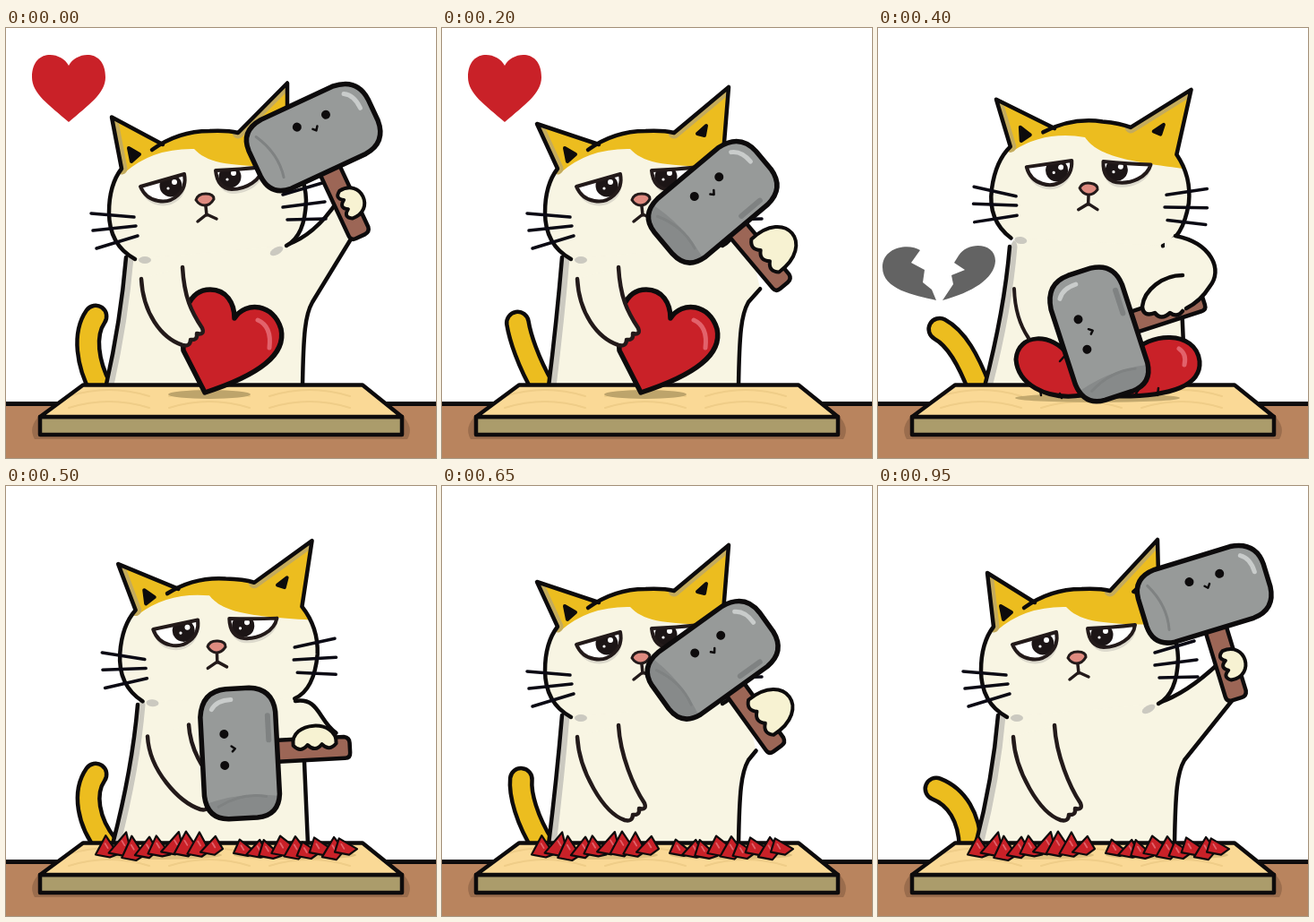
An HTML page with a canvas that plays this animation: 480 by 480 pixels, repeating every 1 s.

```html
<!DOCTYPE html>
<html lang="en">
<head>
<meta charset="utf-8">
<title>Cat and hammer</title>
<style>
html, body { margin: 0; width: 100%; height: 100%; overflow: hidden; background: #fff; }
canvas { display: block; width: 100vw; height: 100vh; }
</style>
</head>
<body>
<canvas id="stage" width="480" height="480"></canvas>
<script>
const ctx = document.getElementById('stage').getContext('2d');
const INK = '#0d0b0c', SOFT_INK = '#231a1a', CREAM = '#f8f5e3', YELLOW = '#ecbd1f', RED = '#c92128',
  SHADE = '#cbc9c0', STEEL = '#979a99', STEEL_DARK = '#7f8282', WOOD = '#9c6656', PINK = '#e2626b';
const STEP = 50, COUNT = 20;
const CRACK = 6, SMASH = 7, BURST = 9;

// Hammer x, y, angle along the blow, from fully raised to impact
const ARC = [[365, 120, -17], [344, 121, -25], [303, 193, -40], [276, 255, -78], [246, 341, -108]];

const mix = (a, b, k) => a + (b - a) * k;
const clamp = v => Math.min(1, Math.max(0, v));
const noise = k => { const v = Math.sin(k * 12.9898) * 43758.5453; return v - Math.floor(v); };

// Place on ARC: slow start, fast blow, short rest, then the reverse
function blow(n) {
  if (n <= 8) return Math.max(n / 2, 1 + n / 4);
  return Math.min(4, Math.max(4 - (n - 9) / 2, 1 - (n - 15) / 4));
}

function poseAt(n) {
  const u = n > 4 && n <= 8 ? n / 2 : n <= 4 ? 1 + n / 4 : blow(n);
  const i = Math.min(3, Math.floor(u));
  const [hx, hy, swing] = ARC[i].map((v, j) => mix(v, ARC[i + 1][j], u - i));
  const lag = n > 11 ? 6 * Math.sin(Math.PI * (n - 11) / 8) : 0;
  const ha = swing + lag, r = ha * Math.PI / 180;
  const lean = clamp(u - 2), press = clamp(u - 3);
  const nx = mix(222, 235, lean), ny = mix(192, 180, lean);
  const near = (n + 1) % COUNT;
  const ear = clamp(1 - Math.min(near, COUNT - near) / 4);
  const free = n >= BURST;
  return {
    nx, ny, hx, hy, ha, ear, tilt: 8 * press,
    bl: 119 - 10 * ear, br: 331 + 12 * press,
    sx: nx - 71 - 12 * press, sy: ny + 88 + 23 * press,
    ex: nx - (free ? 18 : 25), ey: ny + (free ? 181 : 162),
    gx: hx + 8 * Math.cos(r) - 84 * Math.sin(r),
    gy: hy + 8 * Math.sin(r) + 84 * Math.cos(r),
    stage: u < 1.6 ? 'up' : u < 2.4 ? 'mid' : u < 3.6 ? 'over' : 'down'
  };
}

function shape(d, fill, line, width = 4.5) {
  const p = new Path2D(d);
  if (fill) { ctx.fillStyle = fill; ctx.fill(p); }
  if (line) { ctx.strokeStyle = line; ctx.lineWidth = width; ctx.stroke(p); }
}

function ball(x, y, rx, fill, ry = rx, turn = 0) {
  ctx.beginPath();
  ctx.ellipse(x, y, rx, ry, turn, 0, 7);
  ctx.fillStyle = fill;
  ctx.fill();
}

function local(x, y, deg, draw) {
  ctx.save();
  ctx.translate(x, y);
  ctx.rotate(deg * Math.PI / 180);
  draw();
  ctx.restore();
}

function clipped(d, draw) {
  ctx.save();
  ctx.clip(new Path2D(d));
  draw();
  ctx.restore();
}

function table() {
  ctx.fillStyle = '#fff';
  ctx.fillRect(0, 0, 480, 480);
  ctx.fillStyle = '#b9845e';
  ctx.fillRect(0, 419, 480, 61);
  ctx.fillStyle = INK;
  ctx.fillRect(0, 417, 480, 5);
}

function board() {
  const top = 'M86 398.5 H398 L442 434 H38 Z';
  shape('M38 432 Q24 446 32 459 H448 Q456 446 442 432 Z', '#9b6d4d');
  shape('M38 434 H442 V454 H38 Z', '#ab9c6b', INK);
  shape(top, '#fad996');
  for (let i = 0; i < 6; i++) {
    const x = 70 + i % 3 * 112, y = 411 + (i > 2 ? 13 : 0);
    shape(`M${x} ${y} q45 -14 90 0`, null, '#efcd88', 2);
  }
  shape(top, null, INK);
}

function floatingHeart(n) {
  if (n < SMASH) {
    shape('M70 42 C78 26 111 22 111 55 C111 73 92 86 70 105 C48 86 29 73 29 55 C29 22 62 26 70 42', RED);
  } else if (n < 10) {
    const d = n - 8;
    ctx.save();
    ctx.translate(0, d < 0 ? -130 : d * 55);
    ctx.globalAlpha = d > 0 ? .5 : 1;
    local(65 - d * 5, 304, -d * 8, () =>
      shape('M0 0 C-25 -6 -60 -12 -60 -37 C-60 -60 -30 -64 -18 -56 L-28 -42 L-13 -34 L-15 -20 L-5 -12 Z', '#636363'));
    local(72 + d * 5, 304, d * 8, () =>
      shape('M0 0 C33 -9 58 -24 59 -44 C59 -65 28 -66 18 -50 L13 -42 L25 -34 L10 -28 L12 -18 Z', '#636363'));
    ctx.restore();
  }
}

function tail(n, p) {
  const k = n % 10 / 9;
  const d = `M${p.bl - 6} 402 C${mix(91, 102, k)} ${mix(375, 370, k)} ${mix(86, 88, k)} ${mix(342, 347, k)} ` +
    `${100 - 35 * k} ${322 + 16 * k}`;
  shape(d, null, INK, 29);
  shape(d, null, YELLOW, 20);
}

function body({ nx, ny, bl, br, gx, gy, stage }) {
  const side = `Q${nx - 94} ${ny + 135} ${bl} 400`;
  const left = `M${nx - 88} ${ny + 64} ${side}`;
  const reaching = stage === 'up' || stage === 'mid';
  const arm = `L${gx - 17} ${gy} Q${nx + 122} ${ny + 40} ${nx + 91} ${ny + 50}`;
  const right = reaching
    ? `${br} 400 C${br + 1} 340 ${br + 3} 320 342 306 L${gx - (stage === 'mid' ? 8 : 0)} ${gy + 39}`
    : `${br} 400 L${br - 4} 308`;
  const whole = `M${nx - 60} ${ny + 20} L${nx - 88} ${ny + 64} ${side} L${right} ` +
    `${reaching ? arm : `L${nx + 93} ${ny + 45}`} Z`;
  shape(whole, CREAM);
  clipped(whole, () => shape(left, null, SHADE, 17));
  shape(left, null, INK);
  shape('M' + right, null, INK);
  if (stage === 'up') shape('M' + arm.slice(1), null, INK);
}

function eye(d, x, y) {
  ctx.save();
  ctx.translate(1, 5);
  shape(d, '#dcd9cc');
  ctx.restore();
  shape(d, '#fff');
  clipped(d, () => {
    ball(x, y, 12.5, '#1c1516');
    ball(x + 4, y - 4, 3, '#fff');
    ball(x - 3, y + 3, 1.6, '#fff');
  });
  shape(d, null, SOFT_INK, 4);
}

function head(p) {
  const earL = `${mix(-116, -100, p.ear)} ${mix(-85, -95, p.ear)}`;
  const earR = `${mix(98, 90, p.ear)} ${mix(-126, -132, p.ear)}`;
  const left = `M-78 66 Q-107 50 -107 14 Q-107 -17 -93 -35 L${earL} L-47 -62`;
  const right = `5 -77 Q25 -78 37 -75 L${earR} L92 -52 Q112 -30 113 0 Q112 40 91 51`;
  const whole = `${left} Q-20 -77 ${right} Z`;
  shape(whole, CREAM);
  clipped(whole, () => {
    shape('M-140 -22 L-89 -31 Q-58 -58 -12 -57 C4 -40 30 -36 120 -38 V-150 H-140 Z', YELLOW);
    shape(`M-93 -35 L${earL} M37 -75 L${earR}`, null, '#c4ab5c', 13);
  });
  shape(left, null, INK);
  shape('M-59 -56 Q-30 -77 ' + right, null, INK);
  shape('M-85 -58 L-73 -51 L-82 -43 Z M63 -74 L73 -83 L71 -72 Z', INK, INK, 4);
  ball(-67, 67, 7, SHADE, 4);
  if (p.stage === 'up') ball(80, 57, 8, SHADE, 4, -.5);

  eye('M-72 -15 L-23 -29 C-19 -9 -36 4 -52 1 Q-66 -1 -72 -15 Z', -38, -16);
  eye('M12 -33 Q40 -34 65 -37 C63 -22 46 -12 30 -12 Q14 -13 12 -33 Z', 28, -26);
  shape('M-10 0 Q-8 -7 1 -7 Q10 -7 10 -1 Q6 6 0 6 Q-6 6 -10 0 Z', '#df8b80', SOFT_INK, 3);
  shape('M1 7 L2 17 M-8 24 L2 16 L13 21', null, SOFT_INK, 3.5);
  shape('M-127 15 L-79 19 M-125 34 L-77 29 M-121 54 L-75 40 ' +
    'M87 -6 L131 -19 M87 8 L134 2 M92 22 L135 21', null, '#0b0a14', 3.5);
}

function smashed() {
  ball(245, 413, 92, '#c2a86d', 5);
  shape('M154 370 C156 340 195 340 212 365 L228 410 C185 416 156 396 154 370 Z', RED, INK, 5);
  shape('M284 364 C300 340 355 336 359 372 C361 398 330 412 265 411 Z', RED, INK, 5);
  shape('M203 372 L212 362 M181 404 L182 410 M203 408 L205 413 M288 408 L292 402 M312 410 L313 402', null, INK, 2.5);
  shape('M336 358 Q345 364 342 376', null, PINK, 5);
}

function heap(from, to, seed, flight) {
  const total = 9, mid = (from + to) / 2;
  ball(mid, 412, (to - from) / 2, '#dfc07e', 5);
  for (let i = 0; i < total; i++) {
    const r = j => noise(seed + i * 5 + j);
    const x = mix(from + 12, to - 12, i / (total - 1)) + flight * (i - 4) * 3;
    const y = 408 + 8 * r(0) - flight * (12 + 22 * r(1));
    const tip = 16 * r(2) - 8, h = 16 + 10 * r(3);
    shape(`M${x - 12} ${y - 1} L${x + tip} ${y - h} L${x + 13} ${y - 9 * r(4)} L${x + 4} ${y + 2} Z`, RED, INK, 2.2);
    shape(`M${x + tip / 2 - 1} ${y - h * .6} l3 5`, null, PINK, 1.8);
  }
}

function heart(n) {
  if (n >= BURST) {
    const flight = n === BURST ? 1 : 0;
    heap(100, 241, 3, flight);
    heap(254, 391, 70, flight);
    return;
  }
  if (n >= SMASH) return smashed();
  if (n < CRACK) {
    ball(227, 409, 46, '#bda46b', 5);
    shape('M222 407 L198 360 C195 320 203 292 228 292 C246 292 255 307 255 324 ' +
      'C268 304 299 308 307 336 C313 364 284 387 222 407 Z', RED, INK, 5.5);
    shape('M281 326 Q297 333 294 357', null, PINK, 5);
  } else {
    ball(237, 412, 46, '#bda46b', 5);
    shape('M230 411 C205 393 180 370 187 343 C200 318 235 315 246 334 ' +
      'C262 320 305 325 305 356 C303 384 260 398 230 411 Z', RED, INK, 5);
    shape('M240 324 L253 326 L244 352 L250 361 L238 384 L242 364 L235 353 Z', '#fff', INK, 2.5);
    shape('M285 335 Q296 345 290 362', null, PINK, 5);
  }
}

function leftArm({ sx, sy, ex, ey, stage }) {
  if (stage === 'down') {
    shape(`M${sx} ${sy} q1 33 16 55`, null, SOFT_INK, 4);
    return;
  }
  const fx = ex + 22, fy = ey - 19, tx = sx + 46, ty = sy - 13;
  shape(`M${sx} ${sy} C${sx + 2} ${sy + 38} ${ex - 24} ${ey - 8} ${ex} ${ey} ` +
    `q9 2 9 -6 q8 1 7 -7 Q${fx + 3} ${fy + 8} ${fx} ${fy} ` +
    `C${fx - 12} ${fy - 18} ${tx + 2} ${ty + 34} ${tx} ${ty}`, CREAM, SOFT_INK, 4.5);
}

function overArm({ nx, ny, gx, gy }) {
  const d = `M${nx + 88} ${ny + 60} C${nx + 115} ${ny + 56} ${gx + 4} ${gy - 24} ${gx + 24} ${gy - 10}`;
  shape(`${d} L${gx - 20} ${gy + 8} L${nx + 93} ${ny + 128} L${nx + 80} ${ny + 95} Z`, CREAM);
  shape(d, null, INK);
}

function downArm() {
  const arm = 'M332 232 C372 240 386 270 370 289 Q360 305 344 313';
  const hand = 'C318 276 297 292 295 311 Q296 323 309 318 Q316 327 326 318 Q334 324 340 316';
  shape(`${arm} L340 316 Q334 324 326 318 Q316 327 309 318 Q296 323 295 311 C297 292 310 280 320 272 V238 Z`, CREAM);
  shape(`${arm} M340 276 ${hand}`, null, INK);
}

function hammer({ hx, hy, ha, stage }) {
  const raised = stage === 'up';
  local(hx, hy, ha, () => {
    shape('M-12 38 H12 V117 Q11 123 5 123 H-6 Q-12 123 -12 117 Z', WOOD, INK);
    const block = 'M-46 -42 H42 Q71 -39 72 -12 V14 Q70 40 44 42 H-48 Q-72 40 -73 16 V-16 Q-72 -40 -46 -42 Z';
    shape(block, STEEL);
    clipped(block, () => {
      if (!raised) {
        shape('M-58 -50 Q-40 0 -52 50 H-90 V-50 Z', '#878a8a');
        shape('M13 33 H40', null, STEEL_DARK, 6);
      }
      shape('M-59 -27 Q-44 0 -50 27', null, STEEL_DARK, 3);
      shape('M50 -29 Q60 -23 60 -7', null, '#c9cccb', 5);
    });
    shape(block, null, INK, 5.5);
    ball(-13, -17.5, 5, INK);
    ball(22, -16.5, 5, INK);
    shape('M2 -8 L5 -5 L8 -9', null, INK, 2.5);
    if (stage === 'down') return;
    const half = raised ? 17 : 24, reach = stage === 'mid' ? 52 : 28;
    const s = half * 2 / 3;
    ctx.translate(raised ? 0 : 5, 84);
    shape(`M0 ${-half} C${reach} ${-half - 3} ${reach} ${half + 3} 0 ${half} ` +
      `q-9 ${-s / 2} 0 ${-s} `.repeat(3) + 'Z', '#f7f2d2', INK, 4);
  });
}

function render(n) {
  const p = poseAt(n);
  table();
  floatingHeart(n);
  tail(n, p);
  body(p);
  local(p.nx, p.ny, p.tilt, () => head(p));
  board();
  heart(n);
  leftArm(p);
  if (p.stage === 'over') overArm(p);
  hammer(p);
  if (p.stage === 'down') downArm();
}

ctx.lineCap = ctx.lineJoin = 'round';
const start = performance.now();
function tick() {
  const t = Math.max(0, performance.now() - start);
  render(Math.floor(t / STEP) % COUNT);
  requestAnimationFrame(tick);
}
tick();
</script>
</body>
</html>
```
